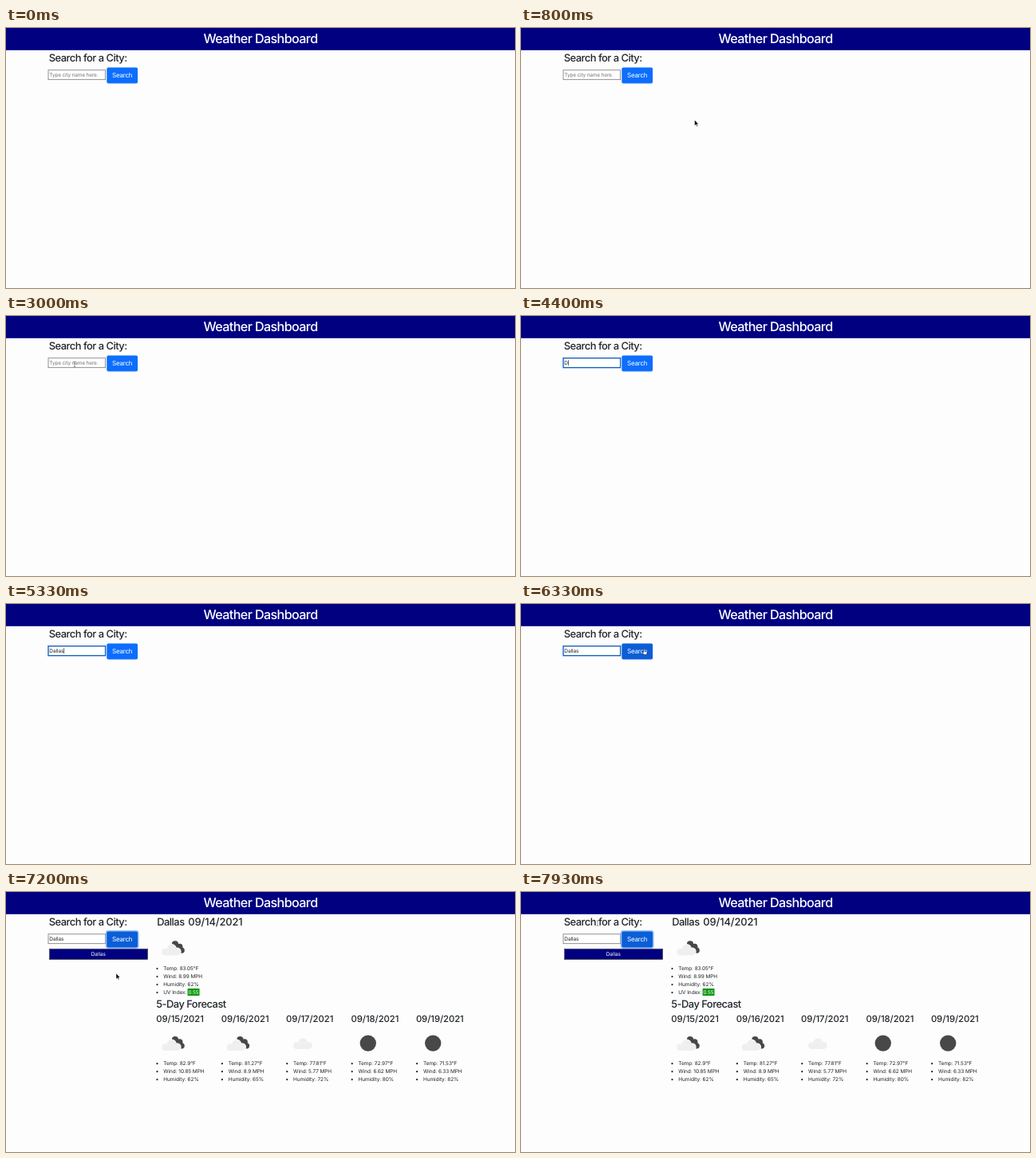
Recreate the animation shown at these times as an HTML page. Size 638 by 326 pixels, loop 8 s.

```html
<!DOCTYPE html>
<html lang="en">
<head>
<meta charset="utf-8">
<title>Weather Dashboard</title>
<style>
  html, body { margin: 0; width: 100%; height: 100%; overflow: hidden; background: #fdfdfd; }
  svg { display: block; width: 100%; height: 100%; }
  text {
    font-family: Inter, Roboto, sans-serif; font-size: 6.47px; letter-spacing: -.01em;
    font-optical-sizing: none; text-rendering: geometricPrecision; fill: #212529; white-space: pre;
  }
  .h1, .h2, .h3 { font-weight: 500; }
  .h1 { font-size: 16.2px; letter-spacing: -.04em; }
  .h2 { font-size: 12.95px; letter-spacing: -.04em; }
  .h3 { font-size: 11.33px; letter-spacing: -.007em; }
  .date { letter-spacing: -.01em; }
  .btn { font-size: 8.1px; letter-spacing: -.035em; }
  .hint { fill: #757575; letter-spacing: -.024em; }
  .white { fill: #fff; }
  .mid { text-anchor: middle; }
</style>
</head>
<body>
<svg viewBox="0 0 638 326">
  <defs>
    <g id="cloud">
      <circle cx="-9.5" cy="5" r="4.3"/><circle cx="-1.5" cy="1.2" r="5.6"/>
      <circle cx="5.5" cy="4.8" r="4.5"/><rect x="-9.5" y="3" width="15" height="6.3"/>
    </g>
    <g id="broken">
      <g fill="#484848">
        <circle cx="3" cy="-4.6" r="4.1"/><circle cx="8.6" cy="-1.4" r="3.9"/>
        <circle cx="11.2" cy="3.2" r="3.6"/><path d="M3-5l6 2 2 9-9-3z"/>
      </g>
      <use href="#cloud" fill="#fdfdfd" stroke="#fdfdfd" stroke-width="1.4"/>
      <use href="#cloud" fill="#efefef"/>
    </g>
    <g id="light"><use href="#cloud" fill="#efefef" x="2" y="-2"/></g>
    <g id="night"><circle r="10.2" fill="#484848"/></g>
  </defs>

  <rect width="638" height="27.8" fill="#000080"/>
  <text class="h1 white mid" x="319" y="18.7">Weather Dashboard</text>
  <text class="h2" x="53.7" y="42.3">Search for a City:</text>

  <rect id="field" x="53" y="52.8" width="71.6" height="11.9" fill="#fff"/>
  <text id="value" x="54.3" y="61"></text>
  <rect id="caret" y="55.2" width=".6" height="7" fill="#000"/>

  <rect id="ring" x="124.7" y="48" width="41.9" height="23" rx="3.4" fill="#98c1fe"/>
  <rect id="button" x="126.3" y="49.6" width="38.8" height="19.8" rx="2"/>
  <text class="btn white mid" x="145.7" y="62.4">Search</text>

  <g id="results">
    <rect x="54" y="71" width="123.6" height="13.6" fill="#000080"/>
    <path d="M54.4 84.6V71.4H177.6" fill="none" stroke="#767676" stroke-width=".8"/>
    <path d="M54 84.2H177.2V71" fill="none" stroke="#333" stroke-width=".8"/>
    <text class="white mid" x="115.8" y="80.1">Dallas</text>
    <text class="h2" x="189.2" y="42.3">Dallas</text>
    <text class="h2 date" x="228.3" y="42.3">09/14/2021</text>
    <use href="#broken" x="209" y="70"/>
    <rect x="227.6" y="121" width="14.9" height="9" fill="#0a960a"/>
    <text class="h2" x="188.2" y="144.7">5-Day Forecast</text>
  </g>
  <g id="pointer"></g>
</svg>
<script>
const $ = id => document.getElementById(id);
const show = (id, on) => $(id).setAttribute('visibility', on ? 'visible' : 'hidden');
const LOOP = 8000;

const list = (x, y, lines) => lines.map((line, i) =>
  `<circle cx="${x + 1.2}" cy="${y + i * 10 - 2.2}" r="1.1" fill="#212529"/>
   <text x="${x + 9}" y="${y + i * 10}">${line}</text>`).join('');
const weather = (temp, wind, humidity) =>
  [`Temp: ${temp}°F`, `Wind: ${wind} MPH`, `Humidity: ${humidity}%`];

const days = [
  ['broken', 82.9, 10.85, 62], ['broken', 81.27, 8.9, 65], ['light', 77.81, 5.77, 72],
  ['night', 72.97, 6.62, 80], ['night', 71.53, 6.33, 82]
];
$('results').innerHTML += list(188.3, 98.3, [...weather('83.05', 8.99, 62), 'UV Index:'])
  + '<text class="white" x="228.4" y="128.1">0.55</text>'
  + days.map(([icon, ...data], i) => {
    const x = 188.3 + i * 81.4;
    return `<text class="h3" x="${x}" y="163.1">09/${15 + i}/2021</text>
      <use href="#${icon}" x="${x + 20.7 - (icon === 'night' ? -.6 : 0)}" y="189.6"/>`
      + list(x, 217.4, weather(...data));
  }).join('');

const shapes = {
  none: '',
  arrow: '<path d="M0 0V7.2L1.7 5.7 2.8 8.2 3.9 7.7 2.8 5.3H5.1Z" fill="#000" stroke="#fff" stroke-width=".5"/>',
  beam: '<path d="M-1.3-3.4Q0-3.4 0-2.6 0-3.4 1.3-3.4M0-2.6V2.6M-1.3 3.4Q0 3.4 0 2.6 0 3.4 1.3 3.4" fill="none" stroke="#555" stroke-width=".6"/>',
  hand: '<path d="M-1.2-3.2Q-.6-3.8 0-3.2V-.8L2.6-.2Q3.2 0 3 1L2.4 3.4H-1L-2.8.8Q-2.6 0-1.2.9Z" fill="#fff" stroke="#111" stroke-width=".5"/>'
};
// time, x, y, pointer shape from then on
const path = [
  [0, 500, 146, 'none'], [260, 500, 146, 'arrow'], [460, 230, 126, 'arrow'],
  [730, 230, 126, 'arrow'], [1130, 160, 66, 'hand'], [1270, 125, 64, 'beam'],
  [1330, 109, 63, 'beam'], [1930, 109, 63, 'beam'], [2200, 88, 61, 'beam'],
  [2530, 88, 61, 'beam'], [2600, 86, 60.5, 'beam'], [4400, 86, 60.5, 'none'],
  [5800, 86, 60.5, 'beam'], [5870, 96, 72, 'arrow'], [6000, 128, 108, 'arrow'],
  [6150, 150, 69, 'hand'], [6270, 155, 60, 'hand'], [6800, 155, 60, 'hand'],
  [6930, 150, 76, 'hand'], [7050, 142, 92, 'arrow'], [7200, 138, 102, 'arrow'],
  [7530, 138, 102, 'arrow'], [7660, 122, 78, 'hand'], [7720, 112, 62, 'beam'],
  [7930, 96, 39, 'beam'], [LOOP, 96, 39, 'beam']
];
const keys = [4400, 4600, 4800, 5060, 5200, 5330];
const FOCUS = 3930, CLICK = 6600, LOADED = 6660;

const ramp = (t, start, span) => Math.min(1, Math.max(0, (t - start) / span));
const mix = (a, b, k) => a + (b - a) * k;

let shape;
function movePointer(t) {
  const i = path.findIndex((p, n) => t < path[n + 1][0]);
  const [t0, x0, y0, kind] = path[i], [t1, x1, y1] = path[i + 1];
  const k = (t - t0) / (t1 - t0);
  if (kind !== shape) $('pointer').innerHTML = shapes[shape = kind];
  $('pointer').setAttribute('transform', `translate(${mix(x0, x1, k)} ${mix(y0, y1, k)})`);
}

function draw(t) {
  const typed = keys.filter(k => t >= k).length;
  const focused = t >= FOCUS && t < CLICK;
  const value = $('value');
  value.textContent = typed ? 'Dallas'.slice(0, typed) : 'Type city name here.';
  value.setAttribute('class', typed ? '' : 'hint');

  $('field').setAttribute('stroke', focused ? '#1a62c0' : '#767676');
  $('field').setAttribute('stroke-width', focused ? 1.4 : .8);
  const lastKey = typed ? keys[typed - 1] : FOCUS;
  show('caret', focused && Math.floor((t - lastKey) / 520) % 2 === 0);
  $('caret').setAttribute('x', 54.4 + (typed ? value.getComputedTextLength() : 0));

  const hover = ramp(t, 1100, 150) - ramp(t, 1330, 150) + ramp(t, 6130, 150);
  const rgb = [[13, 11], [110, 94], [253, 215]].map(([a, b]) => mix(a, b, hover));
  $('button').setAttribute('fill', `rgb(${rgb})`);
  show('ring', t >= CLICK);
  $('ring').setAttribute('opacity', ramp(t, CLICK, 60));
  show('results', t >= LOADED);
  movePointer(t);
}

function frame() {
  draw(performance.now() % LOOP);
  requestAnimationFrame(frame);
}
frame();
</script>
</body>
</html>
```
